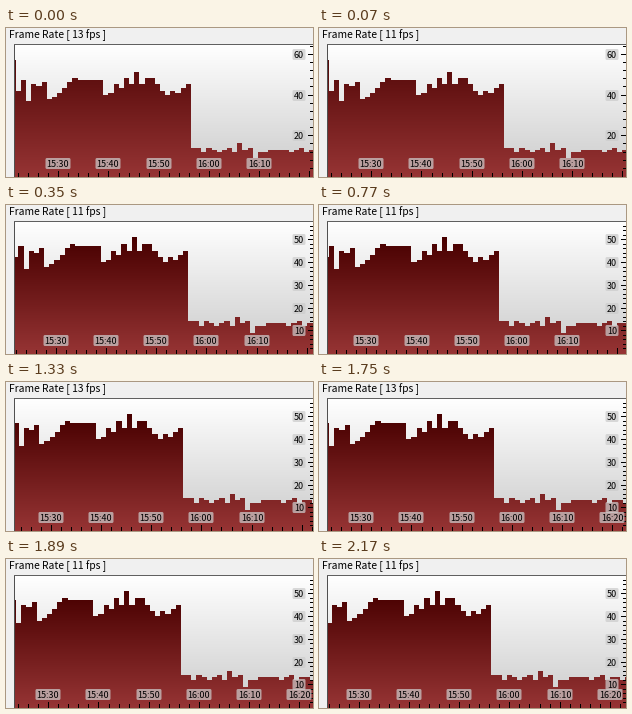
A matplotlib script that plays this animation: 307x149 px, repeating every 2.38 s.

```python
import matplotlib.pyplot as plt
import numpy as np
from matplotlib.animation import FuncAnimation
from matplotlib.colors import LinearSegmentedColormap
from matplotlib.patches import FancyBboxPatch, Polygon, Rectangle

W, H, DPI = 307, 149, 100
STEP_MS, LOOP_MS = 70, 2380
LEFT, TOP, BASE = 8, 16, 148
PEAK_Y = 32            # the tallest visible bar always reaches this row
SECOND = 5.02          # pixels per second
SAMPLE = 5.15          # pixels per reading
SCROLL = 2.5           # pixels per scroll step
SCROLL_AT = [350, 770, 1330, 1750, 2170]
FONT = "Noto Sans CJK JP"

RATES = [57, 42, 47, 37, 45, 44, 46, 38, 39, 41, 43, 46, 48, 47, 47, 47, 47, 47,
         40, 41, 45, 43, 48, 45, 51, 45, 48, 48, 45, 42, 40, 42, 41, 43, 45,
         14, 14, 12, 14, 13, 12, 13, 14, 12, 16, 13, 14, 9, 12, 12, 13, 13,
         13, 13, 12, 13, 14, 12, 13, 13, 12, 13]

SKY = LinearSegmentedColormap.from_list("sky", ["#ffffff", "#cbcbcb"])
RED = LinearSegmentedColormap.from_list("red", ["#480000", "#963434"])

fig = plt.figure(figsize=(W / DPI, H / DPI), dpi=DPI, facecolor="#f0f0f0")
ax = fig.add_axes([0, 0, 1, 1])


def rect(x, y, w, h, color="black"):
    ax.add_patch(Rectangle((x, y), w, h, fc=color, lw=0, zorder=3))


def text(x, y, s, px, ha="left"):
    ax.text(x, y, s, fontsize=px * 72 / DPI, family=FONT, ha=ha,
            va="baseline", color="black", zorder=6)


def gradient(y0, y1, cmap, z):
    ramp = np.linspace(0, 1, 128)[:, None]
    return ax.imshow(ramp, cmap=cmap, extent=(LEFT, W, y1, y0), aspect="auto",
                     interpolation="bilinear", zorder=z)


def tag(x, y, s, w):
    ax.add_patch(FancyBboxPatch((x - w / 2 + 1, y - 4.5), w - 2, 9,
                                boxstyle="round,pad=1,rounding_size=1.5",
                                fc="#cccccc", alpha=0.72, lw=0, zorder=5))
    text(x, y + 3.5, s, 9, ha="center")


def draw_title(t):
    high = t < 70 or 980 <= t < 1890
    text(3.3, 10, f"Frame Rate [ {13 if high else 11} fps ]", 10.3)


def draw_area(shift, scale, shade_top):
    points = [(LEFT, H)]
    for i, rate in enumerate(RATES):
        x0 = round(20.1 + SAMPLE * (i - 3) - shift)
        x1 = round(20.1 + SAMPLE * (i - 2) - shift)
        if x1 <= LEFT or x0 >= W:
            continue
        y = round(BASE - rate * scale)
        points += [(max(x0, LEFT), y), (min(x1, W), y)]
    points.append((W, H))
    shape = Polygon(points, fc="none", ec="none")
    ax.add_patch(shape)
    gradient(shade_top, H, RED, 2).set_clip_path(shape)


def draw_time_axis(shift):
    origin = 52.3 - shift
    for k in range(-5, 30):
        x = round(origin + 2 * k * SECOND)
        if not LEFT < x < W:
            continue
        size = 6 if k % 5 == 0 else 4
        rect(x, H - size, 1, size)
    for k in range(6):
        x = origin + 10 * k * SECOND
        if x + 11.7 < W:
            minute, second = divmod(15 * 60 + 30 + 10 * k, 60)
            tag(round(x), 135.5, f"{minute}:{second:02d}", 25)


def draw_rate_axis(scale, step):
    for k in range(1, 40):
        value = k * step / 5
        y = round(BASE - value * scale)
        if y <= TOP:
            break
        major = k % 5 == 0
        size = 5 if major else 3
        rect(W - size, y, size, 1)
        if major:
            tag(293, y + 0.5, f"{value:.0f}", 13)


def update(i):
    t = i * STEP_MS
    steps = sum(t >= s for s in SCROLL_AT)
    shift = SCROLL * steps
    spike = steps == 0     # the first tall reading is still in view
    scale = (BASE - PEAK_Y) / max(RATES if spike else RATES[1:])

    ax.clear()
    gradient(TOP, H, SKY, 1)
    draw_area(shift, scale, 8 if spike else PEAK_Y)
    rect(LEFT, TOP, 1, H - TOP, "#505050")
    rect(LEFT, TOP, W - LEFT, 1, "#606060")
    draw_time_axis(shift)
    draw_rate_axis(scale, 20 if spike else 10)
    draw_title(t)
    ax.set(xlim=(0, W), ylim=(H, 0))
    ax.axis("off")
    return []


anim = FuncAnimation(fig, update, frames=LOOP_MS // STEP_MS, interval=STEP_MS,
                     init_func=lambda: [], repeat=True, repeat_delay=0)
plt.show()
```
